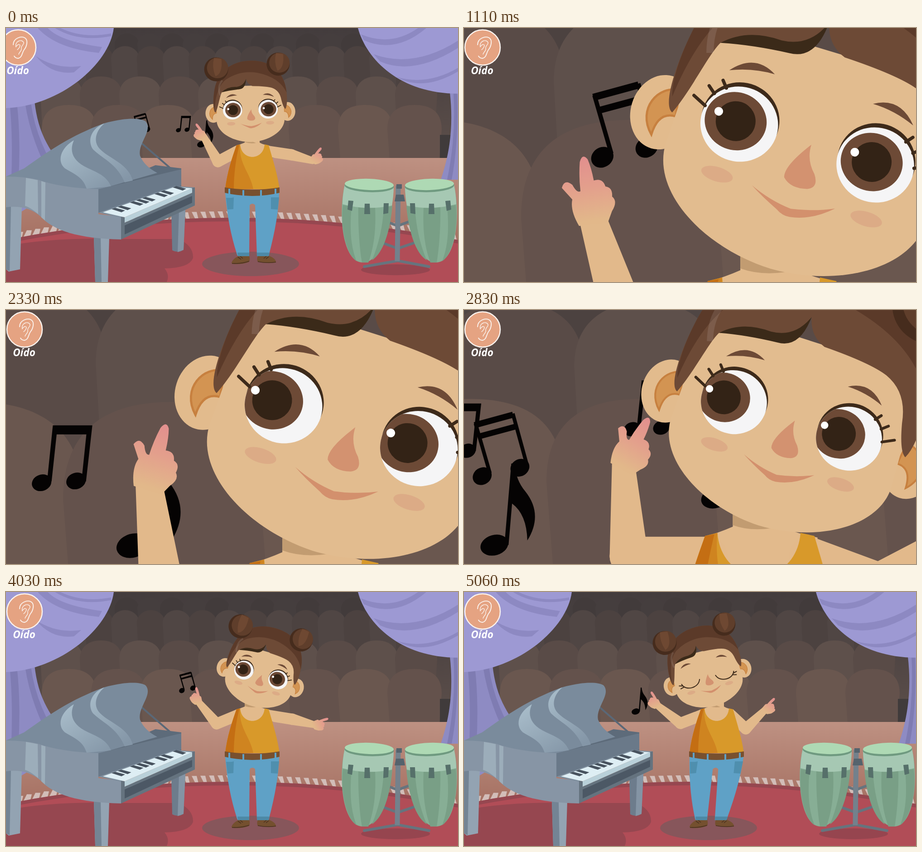
These frames come from a looping animation (998 px wide and 561 px high, 5.14 s). An HTML page:

```html
<!DOCTYPE html>
<html lang="es">
<head>
<meta charset="utf-8">
<style>
html, body { margin: 0; width: 100%; height: 100%; overflow: hidden; background: #4a4141; }
svg { display: block; width: 100vw; height: 100vh; }
</style>
</head>
<body>
<svg viewBox="0 0 998 561" preserveAspectRatio="none">
<defs>
  <linearGradient id="wall" x2="0" y2="1"><stop stop-color="#433c3d"/><stop offset="1" stop-color="#5e504b"/></linearGradient>
  <linearGradient id="floor" x2="0" y2="1"><stop stop-color="#be9182"/><stop offset="1" stop-color="#a46f61"/></linearGradient>
  <linearGradient id="shine" x2=".7" y2="1"><stop stop-color="#b3c8d4"/><stop offset="1" stop-color="#8496a7"/></linearGradient>
  <linearGradient id="handFill" x2="0" y2="1"><stop stop-color="#e28f8e"/><stop offset=".45" stop-color="#e39f8c"/><stop offset=".95" stop-color="#e2b88a"/></linearGradient>
  <clipPath id="eyeClip"><ellipse rx="21.5" ry="20.7"/></clipPath>

  <g id="single">
    <ellipse rx="5.5" ry="4.5" transform="translate(-9.5 .7) rotate(-20)"/>
    <ellipse rx="5.5" ry="4.5" transform="translate(9.5 -.3) rotate(-20)"/>
    <path d="M-6.5 0L-3.3-31H18.5L15 0H12.5L15.2-26H-1.2L-4 0Z"/>
  </g>
  <g id="double">
    <ellipse rx="6.4" ry="5.5" transform="rotate(-32)"/>
    <ellipse rx="6.4" ry="5.5" transform="translate(-24.5 5.5) rotate(-32)"/>
    <path d="M4.5-2L-4.3-34L-28.5-27.5L-19.5 3.5" fill="none" stroke="#050303" stroke-width="2.4"/>
    <path d="M-30-29.5L-5-36.3L-4-32.5L-29-25.700ZM-27.5-22L-3-28.600L-2-25L-26.5-18.400Z"/>
  </g>
  <g id="eighth">
    <ellipse rx="9.2" ry="6.6" transform="rotate(-16)"/>
    <path d="M6.6-1L11-53H13Q14-42 20-35Q32-20 21.4-3Q21-20 11.5-27L9.2 0Z"/>
  </g>

  <g id="conga">
    <path d="M748 346C733 410 742 518 788 518C834 518 853 415 856 350Z" fill="#87ae95"/>
    <path d="M744 391C738 440 751 500 774 515C760 480 759 440 763 394ZM778 395C777 440 781 490 786 518H800C814 480 817 440 815 397ZM834 397C832 440 822 480 808 513C836 495 849 440 853 393Z" fill="#799f86"/>
    <path d="M748 346Q743 370 743 389Q798 404 852 392Q856 370 856 350Z" fill="#a6c8b3"/>
    <ellipse cx="802" cy="349" rx="54.5" ry="13.5" transform="rotate(2 802 349)" fill="#6f9a80"/>
    <ellipse cx="802" cy="345.5" rx="54" ry="12.5" transform="rotate(2 802 345)" fill="#aed9b4"/>
    <path d="M756 381l11 1-3 22-10-3ZM792 388h11l1 23h-13ZM834 387h11l-1 22-11 2Z" fill="#56706a"/>
  </g>
</defs>

<g id="scene">
  <rect width="998" height="300" fill="url(#wall)"/>
  <g id="seats"></g>
  <path d="M958 236H990V290H958Z" fill="#403b3b"/>
  <rect y="287" width="998" height="190" fill="url(#floor)"/>
  <g id="fringe" fill="#d2bdb8"></g>
  <path d="M0 468Q499 370 998 468V561H0Z" fill="#964750"/>
  <path d="M0 476Q499 378 998 476V561H0Z" fill="#b14d57"/>

  <path d="M0 162H63C70 225 90 270 150 335L35 405H0Z" fill="#8e8bc3"/>
  <path d="M8 165Q18 260 8 405H22Q36 270 24 165ZM42 165Q55 250 100 330H120Q66 250 55 165Z" fill="#7f7cb2"/>
  <path d="M0 0H238C228 80 120 172 0 177Z" fill="#9d99d3"/>
  <path d="M92 0Q120 30 212 42L205 55Q110 45 70 0ZM66 62Q110 92 166 84L150 98Q100 104 66 62ZM120 0Q170 24 232 12V18Q160 32 108 0Z" fill="#8d89c2"/>
  <path d="M980 142C990 230 975 290 960 335H998V142Z" fill="#8e8bc3"/>
  <path d="M988 145Q994 240 974 335H984Q1000 250 996 145Z" fill="#7f7cb2"/>
  <path d="M777 0C796 70 870 145 998 145V0Z" fill="#9d99d3"/>
  <path d="M784 14Q850 42 910 0H928Q860 58 790 27ZM812 58Q900 90 998 28V44Q900 106 826 74ZM862 108Q930 128 998 88V96Q930 136 876 115Z" fill="#8d89c2"/>

  <path d="M0 482Q100 462 250 466H380Q414 480 413 508Q405 530 350 531Q362 545 355 561H0Z" fill="#964750"/>
  <ellipse cx="860" cy="534" rx="76" ry="12" fill="#96454f"/>
  <g id="notes" fill="#050303"></g>

  <!-- piano -->
  <path d="M365 408L396 401L392 490Q380 498 367 491Z" fill="#6d7c8c"/><path d="M382 404L396 401L392 490L379 495Z" fill="#8494a4"/>
  <path d="M0 393H35L31 533L6 538L0 533Z" fill="#93a3b2"/><path d="M0 393H11L8 537L0 533Z" fill="#748494"/>
  <path d="M194 462H228L225 561H197Z" fill="#93a3b2"/><path d="M194 462H209L211 561H197Z" fill="#748494"/>
  <path d="M300 255L368 314" stroke="#5a6877" stroke-width="4"/>
  <path d="M204 356L330 303L387 310V350L204 408Z" fill="#5d6b7a"/>
  <path d="M0 328L40 310C110 260 150 236 215 211C260 198 296 198 308 206C326 226 290 255 296 282Q305 305 334 320L204 357H70Z" fill="#7a8b9c"/>
  <path d="M150 248C120 265 112 295 130 310C155 325 170 330 178 355L232 350C220 322 195 318 172 305C146 290 140 270 150 248ZM217 211C190 220 178 248 192 268C215 290 245 300 262 341L280 337C268 298 230 290 208 268C190 250 200 225 217 211Z" fill="url(#shine)"/>
  <path d="M0 328Q40 328 70 335Q120 353 204 356V411L254 417V467C160 465 105 448 75 415Q45 390 0 396Z" fill="#8795a5"/>
  <path d="M44 331Q62 334 70 336L71 411Q52 395 42 393ZM78 338L87 341L86 425L78 418Z" fill="#9cadba"/>
  <path d="M204 356L387 312V348L204 408Z" fill="#6a7989"/>
  <path d="M204 408L372 349L417 352L254 419Z" fill="#7f8f9e"/>
  <path d="M214 407L372 351L411 354L262 418Z" fill="#deeef4"/>
  <path d="M262 418L411 354V364L262 430Z" fill="#b9d0d9"/>
  <g id="blackKeys" fill="#48535f"></g>
  <path d="M254 417L262 418V430L411 364V353L417 352V392L254 467Z" fill="#65737f"/>
  <path d="M262 436L411 371V386L262 456Z" fill="#4c5865"/>

  <!-- drums -->
  <g fill="none" stroke="#66747e" stroke-width="6" stroke-linecap="round">
    <path d="M838 427L865 437L892 427M835 476L865 487L900 475M791 527L865 514L934 527"/>
    <path d="M866 348L864 515" stroke="#73818c" stroke-width="11" stroke-linecap="butt"/>
  </g>
  <path d="M862 345h12v10h-12ZM861 368h17l3 15h-23Z" fill="#55636d"/>
  <use href="#conga"/><use href="#conga" transform="matrix(-1 0 0 1 1737 0)"/>

  <!-- girl -->
  <ellipse cx="540" cy="521" rx="107" ry="27" fill="#87565b"/>
  <path d="M498 518Q502 509 513 504L537 503Q540 513 536 517Q520 523 499 521Z" fill="#74502f"/>
  <path d="M596 516Q594 508 580 503H556Q553 512 556 516Q575 521 596 518Z" fill="#74502f"/>
  <path d="M499 520Q520 521 537 515M556 516Q575 520 596 517M512 506l7 5M517 504l6 5M580 505l-6 5M575 504l-6 5" fill="none" stroke="#4b3220" stroke-width="1.6"/>
  <g id="legs">
    <path d="M484 364H603Q602 420 580 503H554L550 391Q544 385 538 391L537 503H511Q490 440 484 364Z" fill="#5fa1c6"/>
    <path d="M511 496H537V504H512ZM554 496H582L580 504H554Z" fill="#4d89a6"/>
    <path d="M486 375Q497 376 503 374L502 400L489 401ZM585 374L603 374L600 401L585 400Z" fill="#4f8fae"/>
  </g>
  <g id="torso">
    <path d="M527 238V253Q518 257 507 260L505 295H583L582 260Q566 257 560 253V238Z" fill="#e2ba8c"/>
    <path d="M527 244V252Q538 256 552 254Z" fill="#c29c71"/>
  </g>
  <g id="arms" fill="#e2b98b"></g>
  <g id="shirt">
    <path d="M509 259L517 257C520 294 568 294 571 257L580 259C589 290 600 325 604 356H484C488 320 499 287 509 259Z" fill="#d8992a"/>
    <path d="M509 259L517 257C513 300 540 320 546 356H484C488 320 499 287 509 259Z" fill="#cf8420"/>
    <path d="M509 259L515 258C506 295 503 330 503 356H484C488 320 499 287 509 259Z" fill="#c46e13"/>
    <path d="M483 352Q544 362 604 352V364Q544 378 483 364Z" fill="#78502f"/>
    <path d="M493 355v14M524 358v13M563 358v13M595 355v13" stroke="#5fa1c6" stroke-width="4"/>
  </g>
  <g id="head"></g>
</g>

<g id="badge">
  <circle cx="41" cy="43" r="39" fill="#e5a382" stroke="#fbf3ee" stroke-width="2.5"/>
  <g fill="none" stroke="#fbf3ee" stroke-width="1.4" stroke-linecap="round">
    <path d="M30 37C30 22 48 17 56 22C64 28 59 42 54 48C49 55 50 65 41 67Q35 67 32 62" stroke-width="1.9"/>
    <path d="M36 42C33 28 50 24 53 32C54 37 47 39 48 45C49 51 43 53 42 58M37 40Q42 34 45 38Q45 43 39 48"/>
  </g>
  <text x="40" y="101.5" text-anchor="middle" fill="#fff" font-family="'Open Sans', 'Noto Sans', sans-serif" font-weight="700" font-style="italic" font-size="22.5">Oído</text>
</g>
</svg>

<script>
const LOOP = 5140;
const $ = id => document.getElementById(id);
const place = (id, value) => $(id).setAttribute('transform', value);
const clamp = u => Math.min(1, Math.max(0, u));
const ease = (t, from, to) => { const u = clamp((t - from) / (to - from)); return u * u * (3 - 2 * u); };

// Auditorium seats, back row first: y, x, step, width, bottom, two colours
const rows = [
  [12, 90, 50, 54, 100, '#453e3e', '#423b3b'],
  [40, 118, 57, 62, 160, '#504644', '#4c4240'],
  [107, 76, 87, 93, 235, '#5e504b', '#594b47'],
  [170, 79, 109, 120, 288, '#6a574f', '#64524c']
];
$('seats').innerHTML = rows.map(([y, x0, step, w, bottom, a, b]) => {
  let out = '';
  for (let x = x0, i = 0; x + w < 975; x += step, i++) {
    const side = y + w * .45, r = x + w;
    out += `<path fill="${i % 2 ? b : a}" d="M${x + 5} ${bottom}L${x} ${side}C${x} ${y + 12} ${x + w * .23} ${y} ${x + w / 2} ${y}S${r} ${y + 12} ${r} ${side}L${r - 5} ${bottom}Z"/>`;
  }
  return out;
}).join('');

let tassels = '';
for (let x = 0; x < 998; x += 19) {
  const u = x / 998, y = 470 - 196 * u * (1 - u), slant = x < 380 ? 8 : -8;
  tassels += `M${x} ${y}l${slant} -16h11l${-slant / 2} 16Z`;
}
$('fringe').innerHTML = `<path d="${tassels}"/>`;

let keys = '';
for (let i = 0; i < 11; i++) {
  if (i % 7 === 2 || i % 7 === 6) continue;
  keys += `M${233 + i * 13.5} ${400 - i * 4.8}l8 -3 22 6 -8 4Z`;
}
$('blackKeys').innerHTML = `<path d="${keys}"/>`;

// Head, drawn around the chin
const eye = side => `<g transform="translate(${39.2 * side} -72)">
  <g class="open">
    <ellipse cy="-2.3" rx="21.6" ry="20.8" fill="#3d2a1a"/>
    <ellipse rx="21.5" ry="20.7" fill="#f5f5f6"/>
    <g clip-path="url(#eyeClip)"><g class="iris">
      <ellipse rx="17.2" ry="16" fill="#6d4a36"/><circle r="11" fill="#332316"/>
      <circle cx="-10.5" cy="-2.5" r="2.4" fill="#fff"/>
    </g></g>
    <path transform="scale(${-side} 1)" d="M-28.5-8L-21-4.4M-22-15.5L-18-12.2M-15.5-20.6L-12.5-17" stroke="#3d2a1a" stroke-width="1.8" stroke-linecap="round"/>
  </g>
  <path class="closed" transform="scale(${-side} 1)" d="M-20 7C-15 24 15 24 21 6M-18 11L-26 9M-16 14L-24 16" fill="none" stroke="#3d2a1a" stroke-width="2" stroke-linecap="round"/>
</g>`;
const mirrored = side => `<g transform="scale(${-side} 1)">`;
const ear = side => mirrored(side) + `
  <ellipse cx="-82" cy="-66" rx="17.2" ry="20.8" fill="#e2bb8d"/>
  <path d="M-76-80.5C-88-80-96-64-84-52.5Q-84-66-74-66Z" fill="#d39452" stroke="#c7803f" stroke-width="1.2"/></g>`;
const cheekAndBrow = side => mirrored(side) + `
  <ellipse cx="-43" cy="-42" rx="9" ry="4" fill="#dcab86"/>
  <path d="M-53-98.9Q-42-112-28.3-104Q-41-104-53-98.9Z" fill="#6d4a36"/></g>`;
const bun = (x, y, r) => `<g transform="translate(${x} ${y}) scale(${r / 26})">
  <circle r="26" fill="#462c1d"/><ellipse cx="3" cy="-3" rx="23" ry="22.5" fill="#5f3e2b"/>
  <path d="M-4-25Q-10-5-2 15Q14 10 12-22Z" fill="#6e4832"/></g>`;
$('head').innerHTML = '<g transform="translate(0 -6)">' + [-1, 1].map(ear).join('') + `
  <path d="M-75-50C-75-22-38-1 0-.5C38-1 75-22 75-50L72-125H-72Z" fill="#e2bc8f"/>
  <path d="M-76.5-67.5C-83-70-82-95-79-112C-72-158-40-180 3-180C50-180 78-152 81-108Q83-82 77.7-71.5Q73-74 69-92Q66-112 50-118.5Q38-123 6-124Q-5-128-7.8-140Q-10-118-32-117.5Q-48-117.5-62-112C-66.5-104-70-82-76.5-67.5Z" fill="#6d4a36"/>
  <path d="M-79-76C-82-85-81-100-79-112C-72-158-40-180 3-180C50-180 78-152 81-108Q66-142 18-153Q-20-160-52-140Q-74-124-79-76Z" fill="#5b3a29"/>
  <path d="M-62-112Q-50-124-30-123Q-14-124-7.8-140Q-9-118-24-117.5Q-45-116-62-112Z" fill="#3b2a19"/>
  <path d="M-60-138Q-72-126-66-105" fill="none" stroke="#fff" stroke-opacity=".1" stroke-width="4"/>
  ` + bun(-73, -163, 26.5) + bun(64, -171, 25.5) + [-1, 1].map(cheekAndBrow).join('') + `
  <path d="M2.2-72.6Q2-64 8.5-57.5Q13-51 7-48.5Q-2-46-7-51Q-9-57 2.2-72.6Z" fill="#d39270"/>
  <path d="M-22.8-41.7Q-11-36.5 1.5-35.4Q14-37.5 24.9-42.6Q14-32.5 2.1-30.9Q-2-30.4-6-33Q-16-37.5-22.8-41.7Z" fill="#d3906d"/>
  ` + eye(-1) + eye(1) + '</g>';

const openHand = 'M-8 3Q-12-6-10-12L-15-19Q-13-24-9-20Q-7-15-5-16Q-5-24-3.5-32Q-1.5-37 1-33Q2.5-28 3-21Q8-22 9-17Q13-16 12-11Q15-8 11-3L8 3Z';
const pointingFist = 'M-9 4Q-16-2-17-6Q-20-13-18-14.5Q-16-17-14-16Q-14-20-11-19.5Q-9-24-4-21.5L-2-20L-3.5-31Q-2-37 1.5-33Q3.5-26 4-14Q7-13 7-10L7.500 3Z';
const limb = ([x1, y1], r1, [x2, y2], r2) => {
  const d = Math.hypot(x2 - x1, y2 - y1), nx = (y1 - y2) / d, ny = (x2 - x1) / d;
  return `<path d="M${x1 + nx * r1} ${y1 + ny * r1}L${x2 + nx * r2} ${y2 + ny * r2}A${r2} ${r2} 0 0 0 ${x2 - nx * r2} ${y2 - ny * r2}L${x1 - nx * r1} ${y1 - ny * r1}A${r1} ${r1} 0 0 0 ${x1 + nx * r1} ${y1 + ny * r1}Z"/>`;
};
const arm = (shoulder, elbow, wrist, angle, hand, flip) =>
  limb(shoulder, 12.5, elbow, 12.5) + limb(elbow, 12.5, wrist, 7.5) +
  `<path d="${hand}" fill="url(#handFill)" transform="translate(${wrist}) rotate(${angle}) scale(${flip} 1)"/>`;

// time, head tilt, sway, gaze x y, then elbow, wrist and hand angle of each arm
const poses = [
  [0, -1.5, 0, 1, 0, 468, 295, 437, 241, -29, 630, 280, 677, 293, 32],
  [540, 16, 0, 1.5, -1, 465.5, 287, 441.5, 229, -13, 630, 281, 677, 291, 40],
  [1710, 17.5, 0, -6.5, -1, 462, 278, 450, 220, 0, 622, 290, 663, 262, 2],
  [2830, 17.6, 0, -7.2, -1, 459.5, 272, 456, 213, 30, 622, 289, 663, 262, 2],
  [3330, 17.5, 0, -7, -1, 459.5, 272, 457, 212, 12, 622, 290, 663, 262, 2],
  [4030, 16, 0, -2, -1, 465, 291, 426, 244, -9, 632, 281, 680, 293, 65],
  [5060, -14.3, 14, 0, 0, 478, 290, 428, 251, -24, 622, 302, 664, 261, 38]
];
function poseAt(t) {
  const next = poses.findIndex(p => p[0] > t);
  const i = next < 0 ? poses.length - 1 : next;
  const a = poses[i - 1], b = poses[i], u = ease(t, a[0], b[0]);
  return a.map((v, k) => v + (b[k] - v) * u);
}

// kind, time, position at that time, velocity in px per ms
const flights = [
  ['eighth', 0, 431, 257, .152, -.044], ['single', 0, 390, 225, .122, -.054], ['double', 0, 312, 224, .147, -.035],
  ['eighth', 1710, 356.3, 268, .142, -.03], ['single', 2830, 471, 189, .135, -.05],
  ['double', 2830, 388.6, 214.7, .165, -.032], ['single', 2830, 345, 204, .141, -.044], ['eighth', 2830, 372, 265, .168, -.026],
  ['double', 3330, 314, 229, .141, -.024], ['eighth', 5060, 379, 264, .145, -.03]
];

function draw(t) {
  const zoom = 1 + 3 * (ease(t, 30, 540) - ease(t, 2630, 3330));
  place('scene', `translate(499.3 159) scale(${zoom}) translate(-499.3 -159)`);
  place('badge', `translate(${-14 * (1 - ease(t, 30, 250))} 0)`);

  $('notes').innerHTML = flights.map(([kind, t0, x0, y0, vx, vy]) => {
    const x = x0 + vx * (t - t0), y = y0 + vy * (t - t0);
    return x > 285 && x < 530 ? `<use href="#${kind}" x="${x}" y="${y}"/>` : '';
  }).join('');

  const [, tilt, sway, gazeX, gazeY, lex, ley, lwx, lwy, la, rex, rey, rwx, rwy, ra] = poseAt(t);
  const lean = sway / 135;
  place('legs', `matrix(1 0 ${-lean} 1 ${lean * 500} 0)`);
  place('torso', `translate(${sway} 0)`);
  place('shirt', `translate(${sway} 0)`);
  place('head', `translate(${541.5 + sway} 258.3) rotate(${tilt})`);
  const leftHand = t > 1100 && t < 3700 ? openHand : pointingFist;
  $('arms').innerHTML = arm([511 + sway, 272], [lex, ley], [lwx, lwy], la, leftHand, 1) +
    arm([576 + sway, 272], [rex, rey], [rwx, rwy], ra, pointingFist, -1);

  const closed = t > 4580;
  const each = (selector, apply) => document.querySelectorAll(selector).forEach(apply);
  each('.iris', el => el.setAttribute('transform', `translate(${gazeX} ${gazeY})`));
  each('.open', el => el.style.display = closed ? 'none' : '');
  each('.closed', el => el.style.display = closed ? '' : 'none');
}

function tick() {
  draw(performance.now() % LOOP);
  requestAnimationFrame(tick);
}
tick();
</script>
</body>
</html>
```
